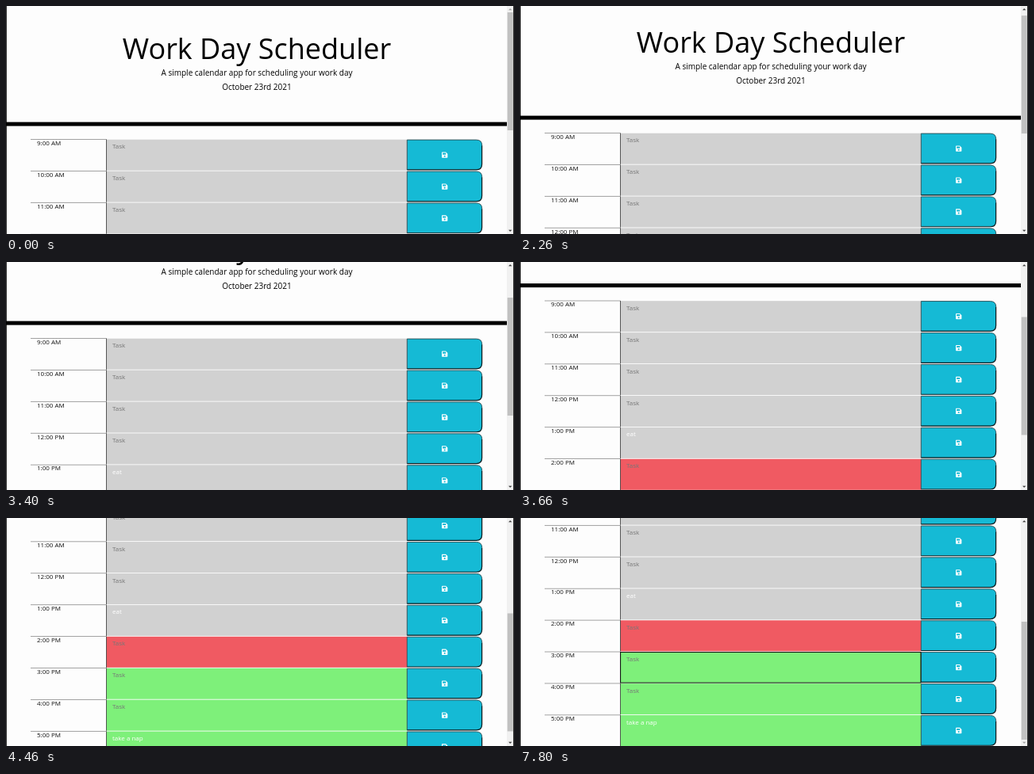
Recreate the animation shown at these times as an HTML page. Size 640 px wide and 288 px high, loop 8000 ms.

```html
<!DOCTYPE html>
<html lang="en">
<head>
<meta charset="utf-8">
<title>Work Day Scheduler</title>
<style>
  html, body { margin: 0; width: 100%; height: 100%; overflow: hidden; background: #fdfdfd; }
  svg { display: block; width: 100vw; height: 100vh; font: 8px "Open Sans", sans-serif; }
</style>
</head>
<body>
<svg id="stage" viewBox="0 0 640 288"></svg>
<script>
const NS = 'http://www.w3.org/2000/svg';
const LOOP = 8000, FOCUS = 6060, BLINK = 533;
const ROW_TOP = 168.3, PITCH = 39.92, MAX_SCROLL = 239;
const GRAY = '#d1d1d1', RED = '#f05a62', GREEN = '#7ef07a';
const stage = document.getElementById('stage');

function add(parent, tag, attrs, text) {
  const el = document.createElementNS(NS, tag);
  for (const k in attrs) el.setAttribute(k, attrs[k]);
  if (text) el.textContent = text;
  return parent.appendChild(el);
}
const rect = (p, x, y, width, height, fill) => add(p, 'rect', { x, y, width, height, fill });
const label = (p, x, y, text, attrs) => add(p, 'text', { x, y, fill: '#111', ...attrs }, text);

rect(stage, 0, 0, 640, 288, '#fdfdfd');
const page = add(stage, 'g', {});

// Header
const centred = { 'text-anchor': 'middle', fill: '#000' };
label(page, 316, 67, 'Work Day Scheduler', { ...centred, 'font-size': 36 });
label(page, 316, 87.5, 'A simple calendar app for scheduling your work day', { ...centred, 'font-size': 10 });
label(page, 316, 105.5, 'October 23rd 2021', { ...centred, 'font-size': 10 });
rect(page, 0, 146.6, 631, 5, '#000');

// Time blocks
function saveButton(g) {
  add(g, 'path', { d: 'M505.3 .8H592.5Q599.7 .8 599.7 8V31.5Q599.7 38.7 592.5 38.7H505.3Z', fill: '#15bad5' });
  add(g, 'path', { d: 'M505.3 38.7V.8H592.5Q599.7 .8 599.7 8', fill: 'none', stroke: '#2c4a50', 'stroke-width': .9 });
  add(g, 'path', { d: 'M599.6 8V31.5Q599.6 38.6 592.5 38.6H505.3', fill: 'none', stroke: '#0b1a1d', 'stroke-width': 1.2 });
  add(g, 'path', {
    transform: 'translate(549 16.2) scale(1.05)', fill: '#fff', 'fill-rule': 'evenodd',
    d: 'M.7 0H4.9L7 2.1V6.3Q7 7 6.3 7H.7Q0 7 0 6.3V.7Q0 0 .7 0Z M1 1H5V3H1Z M2.5 5a1 1 0 1 0 2 0a1 1 0 1 0-2 0Z'
  });
}

function timeBlock(i) {
  const hour = 9 + i;
  const task = { 13: 'eat', 17: 'take a nap' }[hour];
  const color = hour < 14 ? GRAY : hour === 14 ? RED : GREEN;
  const g = add(page, 'g', { transform: `translate(0 ${ROW_TOP + i * PITCH})` });
  rect(g, 31, -.2, 95.5, .8, '#8c8c8c');
  label(g, 39, 7.5, `${(hour + 11) % 12 + 1}:00 ${hour < 12 ? 'AM' : 'PM'}`);
  rect(g, 126.5, .4, 379, 39, color);
  rect(g, 126.2, .2, .8, 39.4, '#333');
  label(g, 134, 12, task || 'Task', { fill: task ? '#fff' : '#777' });
  saveButton(g);
  return g;
}
const blocks = Array.from({ length: 9 }, (_, i) => timeBlock(i));

// Focus ring and caret of the 3:00 PM field
const ring = add(blocks[6], 'rect', {
  x: 126.6, y: .7, width: 378.4, height: 38.6, fill: 'none', stroke: '#101010', 'stroke-width': 1
});
const caret = rect(blocks[6], 133.7, 4.2, .6, 9.6, '#000');

// Scrollbar and window edges
rect(stage, 631, 0, 9, 288, '#f1f1f1');
const thumb = rect(stage, 631.7, 8, 7, 149, '#c1c1c1');
const upArrow = add(stage, 'path', { d: 'M633 5.3L635.2 3L637.4 5.3Z' });
const downArrow = add(stage, 'path', { d: 'M633 282.8L635.2 285.1L637.4 282.8Z' });
rect(stage, 0, 0, .8, 288, '#000');
rect(stage, 639.2, 0, .8, 288, '#000');

// Scroll position over time, joined by a monotone cubic
const keys = [
  [0, 0], [2000, 0], [2260, 8], [2660, 38], [2860, 54], [3200, 69.5], [3335, 69.5],
  [3400, 72], [3930, 181], [4200, 214], [4335, 214], [4800, MAX_SCROLL], [LOOP, MAX_SCROLL]
];
const slope = i => (keys[i + 1][1] - keys[i][1]) / (keys[i + 1][0] - keys[i][0]);
const tangents = keys.map((_, i) => {
  if (i === 0 || i === keys.length - 1) return 0;
  const a = slope(i - 1), b = slope(i);
  return a * b > 0 ? 2 * a * b / (a + b) : 0;
});

function scrollAt(t) {
  let i = 0;
  while (i < keys.length - 2 && t >= keys[i + 1][0]) i++;
  const [t0, y0] = keys[i], [t1, y1] = keys[i + 1];
  const d = t1 - t0, u = (t - t0) / d, v = 1 - u;
  return v * v * (1 + 2 * u) * y0 + u * u * (3 - 2 * u) * y1
    + d * u * v * (v * tangents[i] - u * tangents[i + 1]);
}

const show = (el, on) => el.setAttribute('visibility', on ? 'visible' : 'hidden');

function render(t) {
  const y = Math.round(scrollAt(t) * 2) / 2;
  page.setAttribute('transform', `translate(0 ${-y})`);
  thumb.setAttribute('y', 8 + y / MAX_SCROLL * 123);
  upArrow.setAttribute('fill', y > 0 ? '#404040' : '#a3a3a3');
  downArrow.setAttribute('fill', y < MAX_SCROLL ? '#404040' : '#a3a3a3');
  const focused = t >= FOCUS;
  show(ring, focused);
  show(caret, focused && Math.floor((t - FOCUS) / BLINK) % 2 === 0);
}

const start = performance.now();
function tick() {
  render((performance.now() - start) % LOOP);
  requestAnimationFrame(tick);
}
tick();
</script>
</body>
</html>
```
